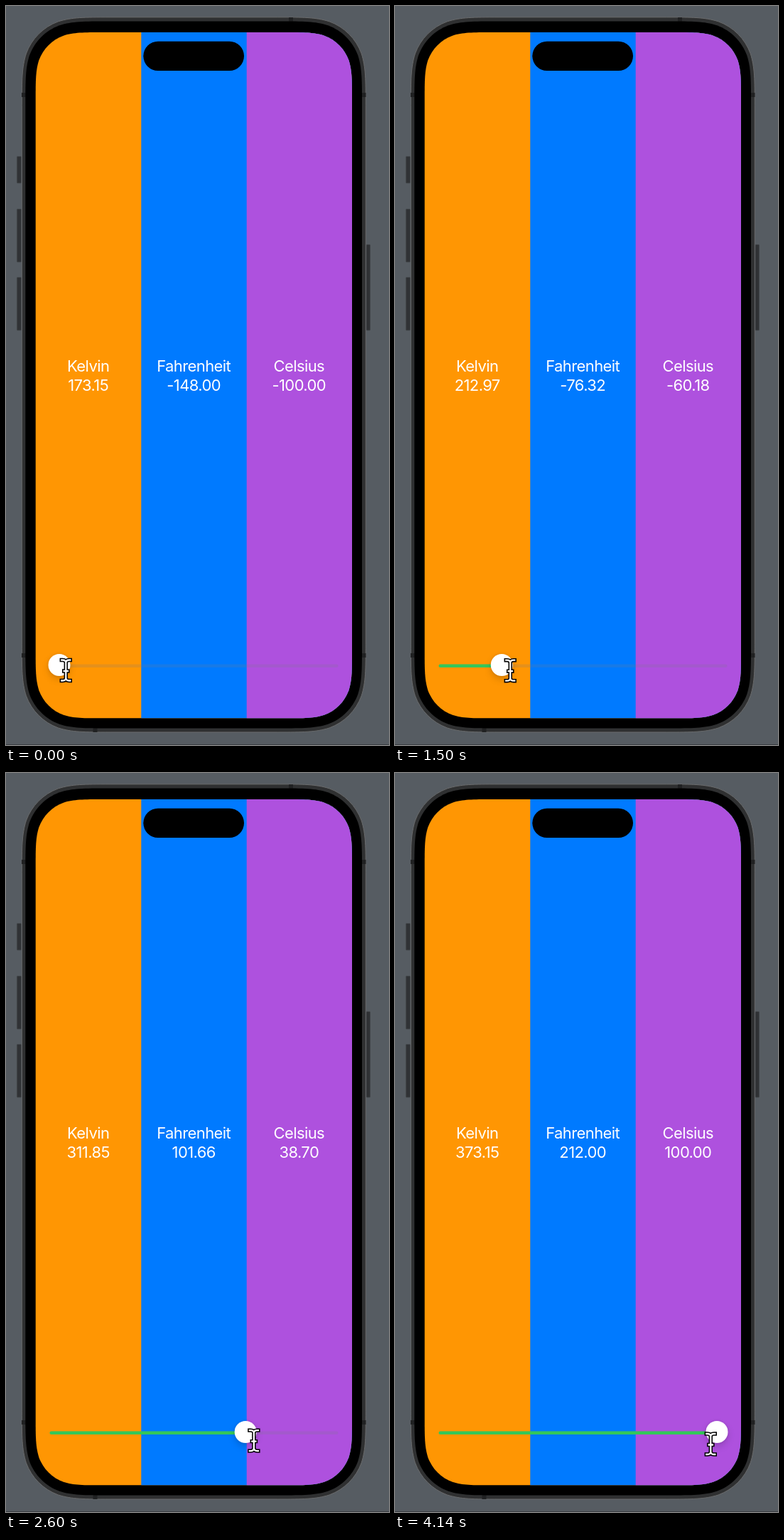
Write an HTML page that moves like this. It is 539 px wide and 1039 px high and loops after 4280 ms.

```html
<!DOCTYPE html>
<html lang="en">
<head>
<meta charset="utf-8">
<title>Temperature slider</title>
<style>
  html, body { margin: 0; width: 100%; height: 100%; overflow: hidden; background: #565c62; }
  svg { display: block; width: 539px; height: 1039px; }
  text { font: 400 22px Inter, Roboto, sans-serif; letter-spacing: -0.6px; fill: #fff; text-anchor: middle; }
  .thumb { filter: drop-shadow(0 .5px 2px rgba(0,0,0,.12)) drop-shadow(0 5px 5px rgba(0,0,0,.14)); }
</style>
</head>
<body>
<svg viewBox="0 0 539 1039">
  <defs>
    <clipPath id="clip"><path id="screen"/></clipPath>
    <path id="beam" fill="none" stroke-linecap="square" stroke-linejoin="round"
      d="M-6-14.5h1.5Q0-14.5 0-10.5Q0-14.5 4.5-14.5h1.5M0-10.5V10.5M-6 14.5h1.5Q0 14.5 0 10.5Q0 14.5 4.5 14.5h1.5M-2.6 1h5.2"/>
  </defs>
  <rect width="539" height="1039" fill="#565c62"/>
  <rect y="1038" width="539" height="1" fill="#383c40"/>

  <g fill="#303235" stroke="#43474b" stroke-width=".8">
    <rect x="15.4" y="211.5" width="6" height="37.5" rx="1"/>
    <rect x="15.4" y="285.5" width="6" height="74.5" rx="1"/>
    <rect x="15.4" y="381.5" width="6" height="74.5" rx="1"/>
    <rect x="507" y="335.5" width="5.5" height="120.5" rx="1"/>
  </g>
  <path id="rim" fill="#2f3031" stroke="#6a6b6c"/>
  <g fill="#202122">
    <rect x="22" y="122" width="6" height="6"/>
    <rect x="500" y="122" width="6.5" height="6"/>
    <rect x="22" y="910" width="6" height="6"/>
    <rect x="500" y="910" width="6.5" height="6"/>
    <rect x="398" y="16" width="6" height="6"/>
    <rect x="122.500" y="1015" width="6" height="6"/>
  </g>
  <path id="bezel"/>

  <g clip-path="url(#clip)">
    <rect x="41" y="36" width="447" height="967" fill="#ff9603"/>
    <rect x="190.300" y="36" width="298" height="967" fill="#007aff"/>
    <rect x="338.700" y="36" width="150" height="967" fill="#ae51de"/>
  </g>
  <rect x="193.300" y="49.700" width="141.700" height="41.300" rx="20.650"/>

  <text x="115.700" y="514">Kelvin</text>
  <text x="264.200" y="514">Fahrenheit</text>
  <text x="412.300" y="514">Celsius</text>
  <text id="kelvin" x="115.700" y="541"/>
  <text id="fahr" x="264.200" y="541"/>
  <text id="cels" x="412.300" y="541"/>

  <rect x="61.500" y="925.600" width="406" height="4.500" rx="2.250" fill="#787880" fill-opacity=".2"/>
  <rect id="fill" x="61.500" y="925.600" height="4.500" rx="2.250" fill="#34c759"/>
  <circle id="thumb" class="thumb" cy="926.500" r="15.500" fill="#fff"/>
  <g id="cursor">
    <use href="#beam" stroke="#000" stroke-width="5.400"/>
    <use href="#beam" stroke="#fff" stroke-width="2.300"/>
  </g>
</svg>
<script>
const LOOP = 4280;
const $ = id => document.getElementById(id);

// Rounded rectangle with smooth, continuous corners.
function smoothRect(l, t, r, b, rad) {
  const corner = [[1.528, 0], [1.0885, 0], [.8684, 0], [.6315, .0749], [.3728, .1691],
    [.1691, .3728], [.0749, .6315], [0, .8684], [0, 1.0885], [0, 1.528]];
  const side = (x, y, sx, sy, flip) => {
    const p = corner.map(([u, v]) => `${x + sx * u * rad},${y + sy * v * rad}`);
    if (flip) p.reverse();
    return `${p[0]}C${p.slice(1).join(' ')}`;
  };
  return 'M' + [side(l, t, 1, 1, false), side(l, b, 1, -1, true),
    side(r, b, -1, -1, false), side(r, t, -1, 1, true)].join('L') + 'Z';
}
$('screen').setAttribute('d', smoothRect(41.7, 37, 487, 1001.3, 62));
$('bezel').setAttribute('d', smoothRect(27.3, 21.5, 501, 1015.5, 76));
$('rim').setAttribute('d', smoothRect(22.3, 15.8, 506.3, 1021, 81));

// Monotone cubic curve through [time, value] points.
function curve(pts) {
  const n = pts.length - 1;
  const d = pts.slice(1).map((p, i) => (p[1] - pts[i][1]) / (p[0] - pts[i][0]));
  const m = pts.map((p, i) => {
    if (i === 0 || i === n) return 0;
    const a = d[i - 1], b = d[i];
    return a * b <= 0 ? 0 : 2 * a * b / (a + b);
  });
  return t => {
    if (t <= pts[0][0]) return pts[0][1];
    if (t >= pts[n][0]) return pts[n][1];
    const i = pts.findIndex(p => p[0] > t) - 1;
    const [t0, v0] = pts[i], [t1, v1] = pts[i + 1];
    const h = t1 - t0, s = (t - t0) / h, q = 1 - s;
    return v0 * (1 + 2 * s) * q * q + m[i] * h * s * q * q
      + v1 * s * s * (3 - 2 * s) - m[i + 1] * h * s * s * q;
  };
}

const drag = curve([[400, -100], [1000, -80.94], [1500, -60.18], [2200, 4.69],
  [3000, 71.16], [3400, 101.9]]);
const offset = curve([[0, 9.3], [1000, 9.3], [1500, 12], [2200, 11.7], [3400, 11.7]]);
const drift = curve([[3700, 0], [4140, -24]]);
const cursorY = curve([[0, 934], [1500, 934.2], [2200, 937], [3000, 940], [3400, 941], [4140, 943.5]]);
const toX = c => 75 + (c + 100) * 1.89;

function draw(ms) {
  const t = ms >= 4140 ? 4140 : Math.min(4000, Math.floor(ms / 100) * 100);
  const pull = drag(t);
  const c = Math.min(100, pull);
  const x = toX(c);
  $('kelvin').textContent = (c + 273.15).toFixed(2);
  $('fahr').textContent = (c * 1.8 + 32).toFixed(2);
  $('cels').textContent = c.toFixed(2);
  $('thumb').setAttribute('cx', x);
  $('fill').setAttribute('width', x - 61.5);
  $('cursor').setAttribute('transform', `translate(${toX(pull) + offset(t) + drift(t)} ${cursorY(t)})`);
}

const start = performance.now();
function tick() {
  draw((performance.now() - start) % LOOP);
  requestAnimationFrame(tick);
}
tick();
</script>
</body>
</html>
```
